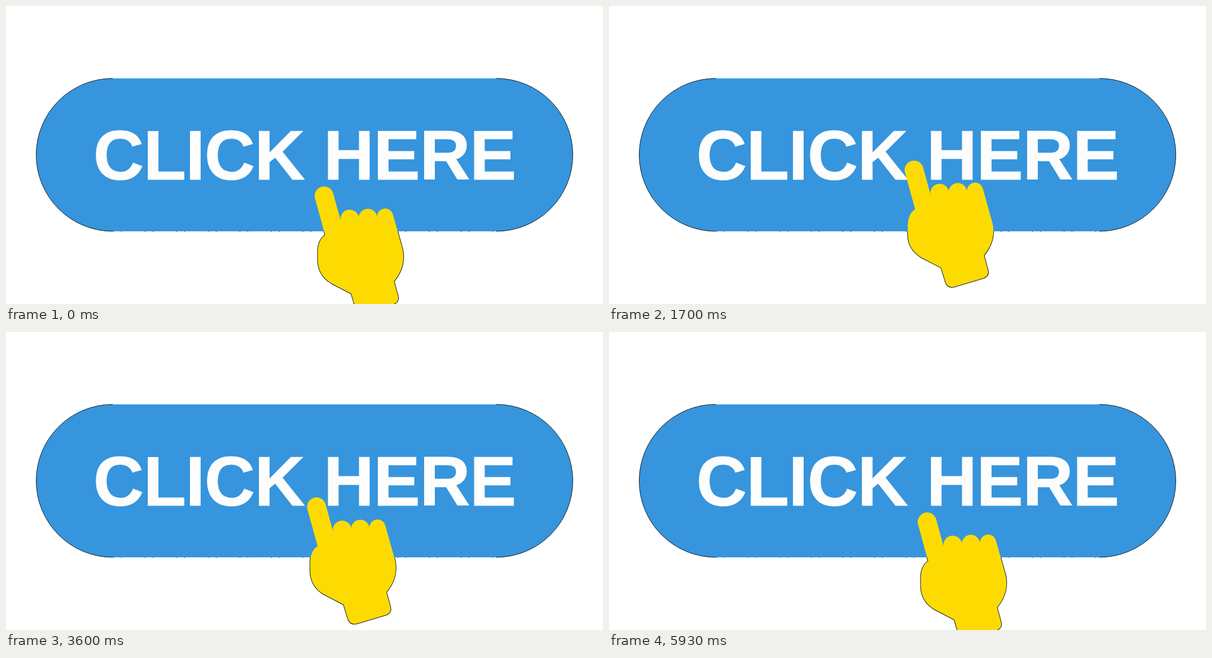
Recreate the animation shown at these times as an HTML page with a canvas. Size 1058x529 px, loop 6010 ms.

```html
<!DOCTYPE html>
<html lang="en">
<head>
<meta charset="utf-8">
<title>Click here</title>
<style>
  html, body { margin: 0; width: 100%; height: 100%; overflow: hidden; background: #fff; }
  canvas { display: block; width: 1058px; height: 529px; }
</style>
</head>
<body>
<canvas id="stage" width="1058" height="529"></canvas>
<script>
const ctx = document.getElementById('stage').getContext('2d');
const W = 1058, H = 529, LOOP = 6010, LAST_STEP = 119, CYCLE = 60;
const BLUE = '#3695dd', YELLOW = '#fedb00', SPARK = '#4463ff', EDGE = '#101c26';

const button = new Path2D();
button.roundRect(53.5, 128.5, 951, 271.5, 135.7);

const outside = new Path2D();
outside.rect(0, 0, W, H);
outside.addPath(button);

// Hand in its raised pose.
const hand = new Path2D(`
  M541 357.5 L523 292 A16.7 16.7 0 0 1 555 282.5 L568.6 332
  A16.3 16.3 0 0 1 600.5 325 A16.4 16.4 0 0 1 633 325
  A14.3 14.3 0 0 1 661 320.5 L678.4 383
  C682 401 679 420 663 439.5 L670 465.5 Q672.5 475.5 663 479.5
  L611 495 Q599 498 595 487 L587.2 461.3 L552 443
  Q528.5 429 528 402 L528 386 Q528.5 366 541 357.5 Z`);

const sparks = [
  [491, 210, 501, 220.5],
  [559.3, 205, 550, 216.5],
  [591, 239.7, 577.5, 247.3],
  [458.7, 262, 472.3, 263],
  [484.5, 300.7, 472, 309.3]
];

const ease = x => (1 - Math.cos(Math.PI * Math.min(1, Math.max(0, x)))) / 2;

function drawButton() {
  ctx.fillStyle = BLUE;
  ctx.fill(button);

  // Dark rim on the round ends only.
  ctx.strokeStyle = EDGE;
  ctx.lineWidth = 1;
  ctx.beginPath();
  ctx.arc(189.2, 264.2, 135.7, Math.PI / 2, Math.PI * 1.5);
  ctx.moveTo(868.8, 128.5);
  ctx.arc(868.8, 264.2, 135.7, -Math.PI / 2, Math.PI / 2);
  ctx.stroke();

  // The lower edge has a few specks.
  ctx.beginPath();
  ctx.setLineDash([1, 13, 1, 41]);
  ctx.moveTo(190, 400.5);
  ctx.lineTo(868, 400.5);
  ctx.stroke();
  ctx.setLineDash([]);

  ctx.fillStyle = ctx.strokeStyle = '#fdfdfd';
  ctx.font = 'bold 124px "Liberation Sans", Arial, sans-serif';
  ctx.letterSpacing = '-0.9px';
  ctx.fillText('CLICK HERE', 154.8, 307.6);
  ctx.strokeText('CLICK HERE', 154.8, 307.6);
}

function drawSparks() {
  ctx.strokeStyle = SPARK;
  ctx.lineWidth = 21;
  ctx.lineCap = 'round';
  for (const [x1, y1, x2, y2] of sparks) {
    ctx.beginPath();
    ctx.moveTo(x1, y1);
    ctx.lineTo(x2, y2);
    ctx.stroke();
  }
  ctx.lineCap = 'butt';
}

function drawHand(lift) {
  const drop = 1 - lift;
  const dx = 25.3 * drop - 0.7, dy = 50.2 * drop - 0.9;

  // The dark rim shows only off the button.
  ctx.save();
  ctx.clip(outside, 'evenodd');
  ctx.translate(dx, dy);
  ctx.strokeStyle = EDGE;
  ctx.lineWidth = 2;
  ctx.lineJoin = 'round';
  ctx.stroke(hand);
  ctx.restore();

  ctx.save();
  ctx.translate(dx, dy);
  ctx.fillStyle = YELLOW;
  ctx.fill(hand);
  ctx.restore();
}

function render(now) {
  const t = now % LOOP;
  // Steps alternate between 30 and 70 ms.
  const step = Math.min(LAST_STEP, 2 * Math.floor(t / 100) + (t % 100 >= 30 ? 1 : 0));
  const phase = step % CYCLE + 0.5;
  const lift = ease(phase / 24) - ease((phase - 30) / 24);

  ctx.fillStyle = '#fff';
  ctx.fillRect(0, 0, W, H);
  drawButton();
  if (phase > 20 && phase < 33) drawSparks();
  drawHand(lift);
}

const start = performance.now();
function tick() {
  render(performance.now() - start);
  requestAnimationFrame(tick);
}
tick();
</script>
</body>
</html>
```
